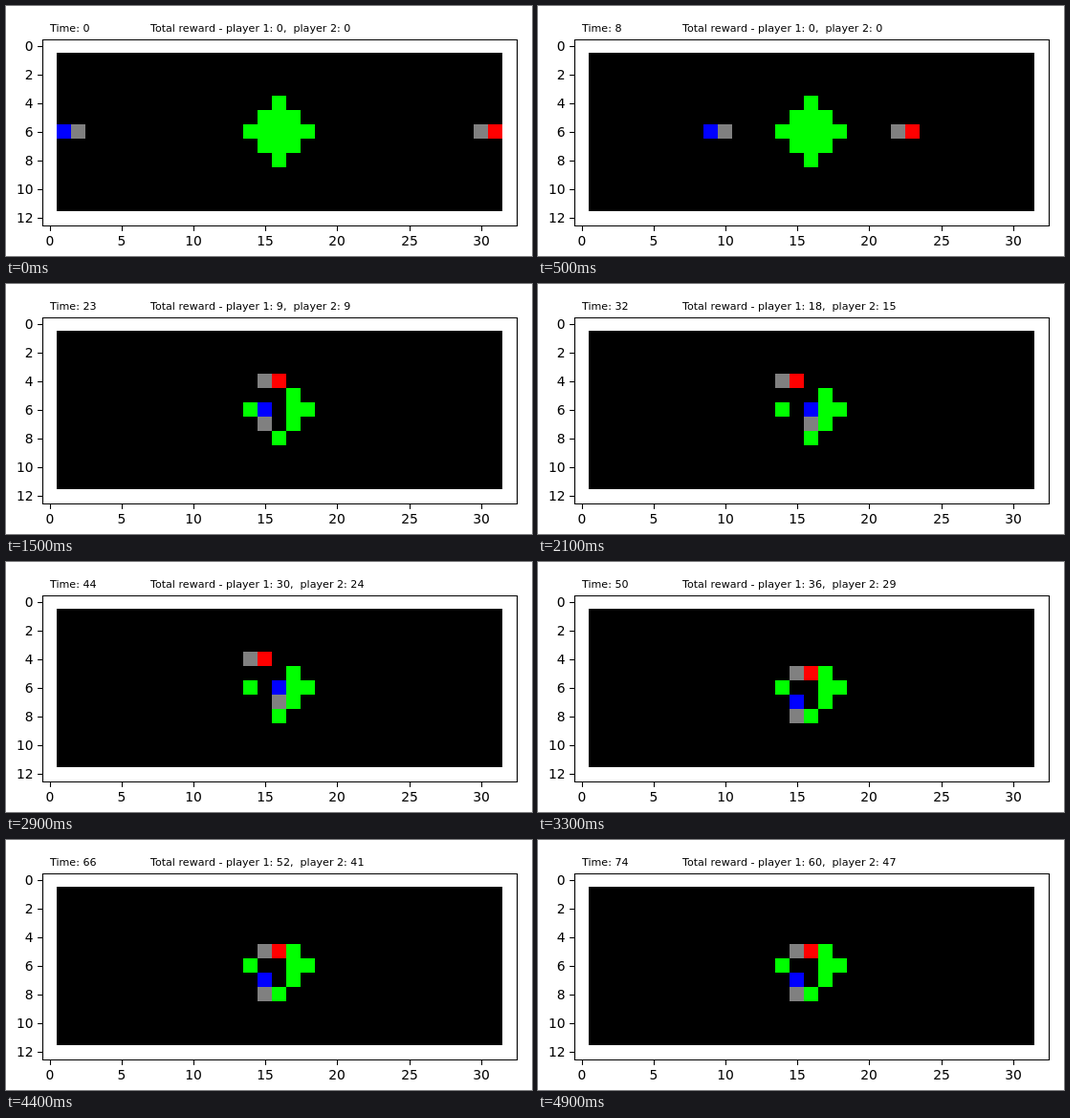
Animation, 550 px wide and 262 px high, one loop 5 s. Source, as an HTML page:

```html
<!DOCTYPE html>
<html lang="en">
<head>
<meta charset="utf-8">
<title>Two player gathering</title>
<style>
  html, body { margin: 0; width: 100%; height: 100%; overflow: hidden; background: #fff; }
  svg { display: block; width: 550px; height: 262px; }
  text { font-family: "DejaVu Sans", sans-serif; font-size: 13.89px; white-space: pre; }
  .note { font-size: 11.11px; }
</style>
</head>
<body>
<svg id="stage" viewBox="0 0 550 262">
  <rect width="550" height="262" fill="#fff"/>
  <g id="axes"></g>
  <g id="board" shape-rendering="crispEdges"></g>
  <text id="clock" class="note" x="46" y="27"></text>
  <text id="score" class="note" x="151" y="27"></text>
</svg>
<script>
const LOOP = 5000, STEP = 100, LAST = 74, REGROW = 4;
const MOVES = { R: [1, 0], L: [-1, 0], U: [0, -1], D: [0, 1], '-': [0, 0] };
const byId = id => document.getElementById(id);
const edgeX = c => Math.round(38.1 + 15.02 * c);
const edgeY = r => Math.round(34.2 + 15.03 * r);

function add(parent, tag, attrs, text) {
  const el = document.createElementNS('http://www.w3.org/2000/svg', tag);
  for (const k in attrs) el.setAttribute(k, attrs[k]);
  if (text !== undefined) el.textContent = text;
  parent.appendChild(el);
  return el;
}

function block(c, r, w, h, fill) {
  const x = edgeX(c), y = edgeY(r);
  return add(byId('board'), 'rect',
    { x, y, width: edgeX(c + w) - x, height: edgeY(r + h) - y, fill });
}

function drawAxes() {
  const g = byId('axes');
  const line = d => add(g, 'path', { d, fill: 'none', stroke: '#000', 'stroke-width': 1.1 });
  line('M38.5 35.5H534.5V230.5H38.5Z');
  for (let v = 0; v <= 30; v += 5) {
    const x = Math.round(45.8 + 15.03 * v);
    line(`M${x + 0.5} 231v4.9`);
    add(g, 'text', { x, y: 251, 'text-anchor': 'middle' }, v);
  }
  for (let v = 0; v <= 12; v += 2) {
    const y = Math.round(42 + 15.03 * v);
    line(`M38 ${y + 0.5}h-4.9`);
    add(g, 'text', { x: 28.6, y: y + 5, 'text-anchor': 'end' }, v);
  }
}

// Food fills a diamond of radius 2 around (16, 6).
const food = [];
for (let r = 4; r <= 8; r++)
  for (let c = 14; c <= 18; c++)
    if (Math.abs(c - 16) + Math.abs(r - 6) <= 2) food.push({ c, r, eaten: -REGROW });

const blueMove = t => t < 15 ? 'R' : t < 16 ? '-' : 'RDLU'[t % 4];
const redMove = t => t < 16 ? 'L' : t < 20 ? 'ULUR'[t - 16] : 'LDRU'[t % 4];

// Play the whole game once; each state depends only on its step.
function play() {
  const blue = { c: 1, r: 6, score: 0, move: blueMove };
  const red = { c: 31, r: 6, score: 0, move: redMove };
  const states = [];
  for (let t = 0; t <= LAST; t++) {
    for (const p of [blue, red]) {
      if (t) {
        const [dc, dr] = MOVES[p.move(t)];
        p.c += dc;
        p.r += dr;
      }
      const f = food.find(f => f.c === p.c && f.r === p.r);
      if (f && t - f.eaten >= REGROW) {
        f.eaten = t;
        p.score++;
      }
    }
    states.push({
      blue: { ...blue }, red: { ...red },
      ripe: food.map(f => t - f.eaten >= REGROW)
    });
  }
  return states;
}

drawAxes();
block(1, 1, 31, 11, '#000');
const foodRects = food.map(f => block(f.c, f.r, 1, 1, '#0f0'));
const [blueAim, redAim, blueRect, redRect] =
  ['#808080', '#808080', '#00f', '#f00'].map(fill => block(1, 6, 1, 1, fill));
const states = play();

function place(rect, c, r) {
  const x = edgeX(c), y = edgeY(r);
  rect.setAttribute('x', x);
  rect.setAttribute('y', y);
  rect.setAttribute('width', edgeX(c + 1) - x);
  rect.setAttribute('height', edgeY(r + 1) - y);
}

let shown = -1;
function render(ms) {
  const t = Math.ceil(1.5 * Math.floor((ms % LOOP) / STEP));
  if (t === shown) return;
  shown = t;
  const { blue, red, ripe } = states[t];
  foodRects.forEach((el, i) => el.setAttribute('visibility', ripe[i] ? 'visible' : 'hidden'));
  const down = t >= 15 ? 1 : 0;
  place(blueAim, blue.c + 1 - down, blue.r + down);
  place(redAim, red.c - 1, red.r);
  place(blueRect, blue.c, blue.r);
  place(redRect, red.c, red.r);
  byId('clock').textContent = `Time: ${t}`;
  byId('score').textContent =
    `Total reward - player 1: ${blue.score},  player 2: ${red.score}`;
}

const start = performance.now();
function tick() {
  render(performance.now() - start);
  requestAnimationFrame(tick);
}
tick();
</script>
</body>
</html>
```
